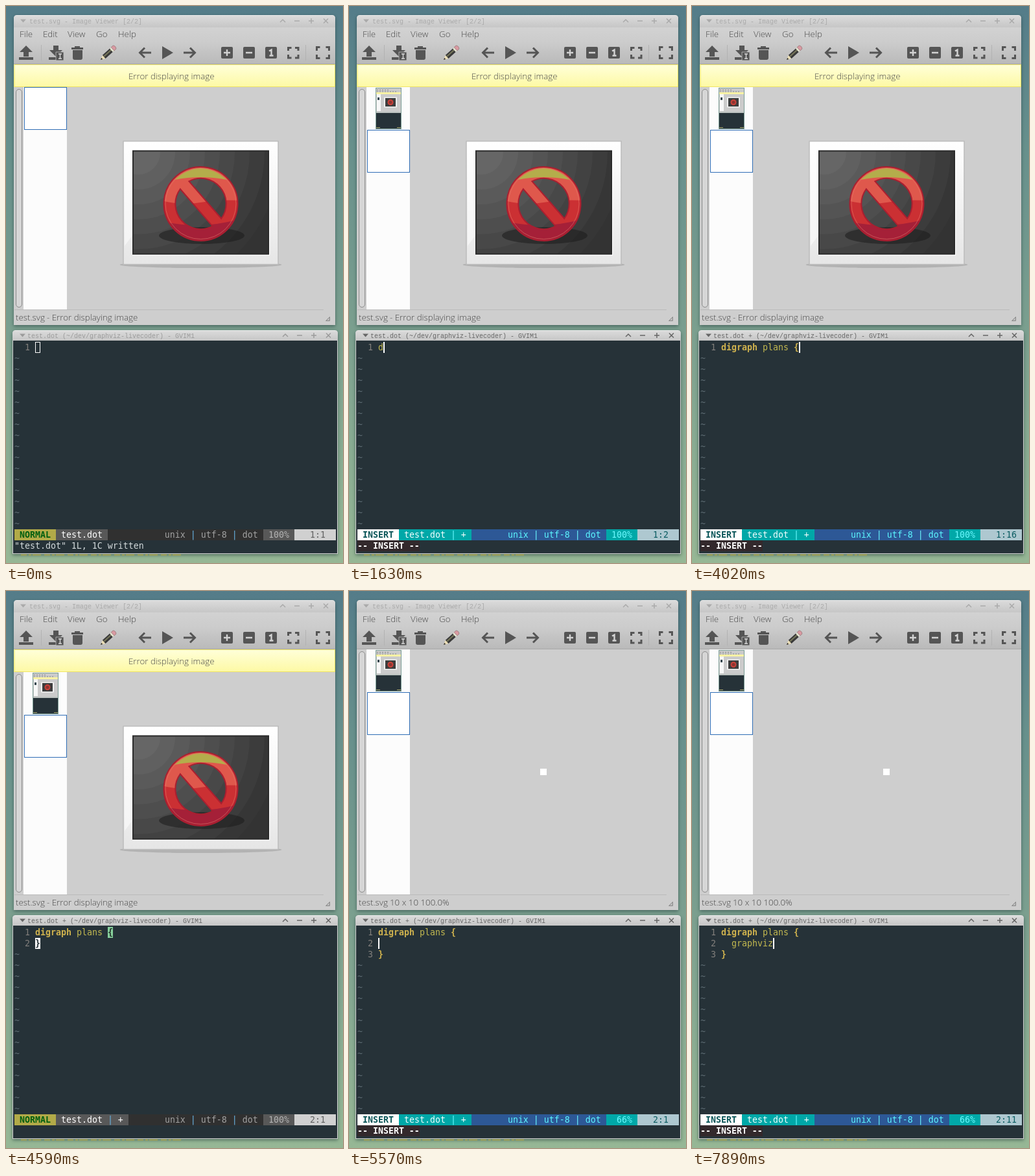
Write an HTML page that moves like this. It is 520 px wide and 859 px high and loops after 8000 ms.

```html
<!DOCTYPE html>
<html lang="en">
<head>
<meta charset="utf-8">
<title>Graph live coding</title>
<style>
html, body { margin: 0; width: 100%; height: 100%; overflow: hidden; }
body {
  position: relative;
  background: linear-gradient(#547c89, #67908c 25%, #7ca08f 60%, #96b795);
}
svg { position: absolute; left: 0; top: 0; }
.win { position: absolute; border-radius: 5px 5px 0 0; box-shadow: 0 2px 5px rgba(20, 45, 45, .5); }
#viewer { left: 12px; top: 14px; width: 496px; height: 478px; background: #cecece; }
#editor { left: 10px; top: 500px; width: 502px; height: 345px; background: #d0d0d0; }
.ui { font: 300 13.33px "Open Sans", sans-serif; fill: #4a4a4a; }
.title { font: 10px "Liberation Mono", monospace; }
.ok .err, svg:not(.ok) .good { display: none; }
.two #first, svg:not(.two) #thumb { display: none; }
#grid {
  position: absolute; left: 13px; top: 518px; width: 496px; height: 323px;
  font: 13.289px/17px "DejaVu Sans Mono", monospace; color: #c3b950;
}
#grid span { position: absolute; height: 17px; white-space: pre; }
#grid .num { color: #827f7c; }
#grid .tilde { color: #5d6c73; }
#grid .key { color: #cfb24e; font-weight: bold; }
#grid .match { background: #86cf9b; color: #24352c; font-weight: bold; }
#grid .box { box-sizing: border-box; width: 8px; border: 1px solid #fff; }
#grid .block { width: 8px; background: #fff; color: #263238; font-weight: bold; }
#grid .bar { width: 2px; background: #fff; }
#grid .msg { color: #d3dadc; }
#grid .ins { color: #fff; background: #33292c; font-weight: bold; }
#grid .mode { font-weight: bold; }
.N .mode { background: #b2aa48; color: #005f10; }
.N .file { background: #585858; color: #fff; }
.N .mid { background: #303030; color: #a2a2a2; }
.N .pct { background: #585858; color: #b4b4b4; }
.N .pos { background: #d0d0d0; color: #606060; }
.N i { color: #68b4e4; font-style: normal; }
.I .mode { background: #fff; color: #0a5558; }
.I .file { background: #00a8a8; color: #f2ffff; }
.I .mid { background: #2d5896; color: #5cf6ff; }
.I .pct { background: #00a8a8; color: #6cfaff; }
.I .pos { background: #aec8d0; color: #0a5c62; }
.I i { color: #6cfaff; font-style: normal; }
</style>
</head>
<body>
<div class="win" id="viewer"></div>
<div class="win" id="editor"></div>

<svg id="scene" width="520" height="859" viewBox="0 0 520 859">
  <defs>
    <linearGradient id="bar" x2="0" y2="1"><stop stop-color="#dcdcdc"/><stop offset="1" stop-color="#c6c6c6"/></linearGradient>
    <linearGradient id="tools" x2="0" y2="1"><stop stop-color="#d2d2d2"/><stop offset=".4" stop-color="#cccccc"/><stop offset="1" stop-color="#b9b9b9"/></linearGradient>
    <linearGradient id="warn" x2="0" y2="1"><stop stop-color="#ffffda"/><stop offset="1" stop-color="#fdf9a4"/></linearGradient>
    <linearGradient id="mat" x2="0" y2="1"><stop stop-color="#fff"/><stop offset="1" stop-color="#e6e6e6"/></linearGradient>
    <clipPath id="photo"><rect x="197" y="224" width="208" height="158"/></clipPath>
    <path id="ring" d="M-57 0A57 57 0 1 1 57 0A57 57 0 1 1 -57 0ZM-38 -9A39 39 0 0 1 38 -9ZM-38 9A39 39 0 0 0 38 9Z" transform="translate(300.500 305) rotate(49)"/>
    <clipPath id="sign"><use href="#ring" clip-rule="evenodd"/></clipPath>
    <g id="buttons" fill="none" stroke="currentColor" stroke-width="1.500">
      <path d="M0 2l4-4 4 4M22 0h8M44 0h8M48 -4v8M67 -3.500l7 7M74 -3.500l-7 7"/>
    </g>
  </defs>

  <!-- image viewer chrome -->
  <path d="M12 33V19q0-5 5-5H503q5 0 5 5V33z" fill="url(#bar)"/>
  <path d="M16 14.500H504" stroke="#ebebeb"/>
  <g color="#aaa" fill="#aaa">
    <path d="M22 20.500h9l-4.500 5z"/>
    <text class="title" x="36" y="27">test.svg - Image Viewer [2/2]</text>
    <use href="#buttons" x="423" y="23"/>
  </g>
  <rect x="12" y="33" width="496" height="57" fill="url(#tools)"/>
  <path d="M12 89.500H508" stroke="#a8a8a8"/>
  <g class="ui">
    <text x="21" y="48">File</text><text x="57" y="48">Edit</text><text x="95" y="48">View</text>
    <text x="139" y="48">Go</text><text x="173" y="48">Help</text>
  </g>
  <path d="M54.500 60V84M462.500 60V84" stroke="#b2b2b2"/>
  <g fill="#555">
    <path d="M31 61l10 10h-6v7h-8v-7h-6zM20 79h22v4H20z"/>
    <path d="M73 61h8v7h6l-10 10-10-10h6zM66 79h11v4H66z"/>
    <path d="M77 71h12v13H77z" stroke="#c2c2c2" stroke-width=".8"/>
    <path d="M101 64h5v-2h8v2h5v3h-18zM103 68h15v12q0 3-3 3h-9q-3 0-3-3z"/>
    <path d="M241 62l17 10-17 10z"/>
    <rect x="332" y="63" width="18" height="18" rx="2"/>
    <rect x="366" y="63" width="18" height="18" rx="2"/>
    <rect x="400" y="63" width="18" height="18" rx="2"/>
  </g>
  <path d="M81 74h5M83.500 74v7M81 81h5" stroke="#ddd" stroke-width="1.300" fill="none"/>
  <path d="M336 72h10M341 67v10M370 72h10M406 69.500l3.500-2v9M406.500 76.500h6" stroke="#d2d2d2" stroke-width="2.400" fill="none"/>
  <g fill="none" stroke="#555" stroke-width="3">
    <path d="M207 72h17M214 64.500l-7.500 7.500 7.500 7.500M274 72h17M284 64.500l7.500 7.500-7.500 7.500"/>
    <path id="corners" d="M435.500 69v-4.500h5M446 64.500h5v4.500M451 75v5h-5M440.500 80h-5v-5"/>
    <path d="M479.500 69v-5.500h5M493.500 63.500h5v5.500M498.500 75v5.500h-5M484.500 80.500h-5v-5.500"/>
  </g>
  <g transform="translate(146 83) rotate(-42)">
    <path d="M0 0L7-3.500V3.500z" fill="#eadcb4"/><path d="M0 0l3-1.500v3z" fill="#222"/>
    <path d="M7-3.500H23v7H7z" fill="#3a3a3a"/><path d="M7-1.500H23v2H7z" fill="#77775a"/>
    <path d="M22-3.500h3v7h-3z" fill="#e3e3d0"/><path d="M25-3.500h4q3 3.500 0 7h-4z" fill="#d99aa2" stroke="#8a6a6a" stroke-width=".6"/>
  </g>

  <!-- thumbnails -->
  <rect x="27" y="90" width="67" height="378" fill="#fcfcfc"/>
  <g fill="#d6d6d6" stroke="#8c8c8c">
    <rect class="err" x="15.500" y="128.500" width="9" height="336" rx="4.500"/>
    <rect class="good" x="15.500" y="93.500" width="9" height="371" rx="4.500"/>
  </g>
  <g id="list">
    <g id="thumb">
      <rect x="41" y="126" width="40" height="64" fill="#7a9c94"/>
      <rect x="42" y="127" width="38" height="36" fill="#cbcbcb"/>
      <path d="M43 129.500h20M43 132h32" stroke="#868686" stroke-dasharray="2 2"/>
      <rect x="42" y="133" width="38" height="3" fill="#f8f2a4"/>
      <rect x="43" y="136" width="6" height="26" fill="#f7f7f7"/>
      <rect x="44" y="141" width="3" height="4" fill="#37474f"/>
      <rect x="54" y="140.500" width="20" height="16" fill="#eee"/>
      <rect x="56" y="142" width="16" height="13" fill="#3d3d3d"/>
      <circle cx="64" cy="148.500" r="3.500" fill="#8a3532" stroke="#cc4038" stroke-width="2"/>
      <rect x="42" y="163" width="38" height="2" fill="#bdc3c0"/>
      <rect x="42" y="165" width="38" height="24" fill="#263238"/>
      <path d="M42 187.500h6M74 187.500h6" stroke="#a7a76c"/>
    </g>
    <rect id="pick" x="28.500" y="125.500" width="65" height="65" fill="#fff" stroke="#2f6db5"/>
  </g>

  <!-- error picture -->
  <g class="err">
    <rect x="12" y="90" width="496" height="35" fill="url(#warn)"/>
    <rect x="13" y="90.500" width="494.500" height="34" fill="none" stroke="#f0e564"/>
    <text class="ui" x="189" y="113">Error displaying image</text>
    <ellipse cx="300.500" cy="399" rx="125" ry="5" fill="#b2b2b2"/>
    <rect x="181" y="208.500" width="239" height="190" fill="url(#mat)" stroke="#bcbcbc" stroke-width="1.500"/>
    <path d="M183 370L300 210H183z" fill="#fff" opacity=".5"/>
    <rect x="195" y="222" width="212" height="163" fill="#fff"/>
    <g clip-path="url(#photo)" id="glow"><rect x="196" y="223" width="210" height="160" fill="#333"/></g>
    <ellipse cx="302" cy="354" rx="66" ry="13" fill="#1d1d1d" opacity=".55"/>
    <rect x="196" y="223.500" width="209" height="159" fill="none" stroke="#2b2b2b" stroke-width="2"/>
    <g clip-path="url(#sign)">
      <rect x="240" y="245" width="122" height="122" fill="#df584c"/>
      <path d="M240 300Q270 308 300 303T362 300V367H240z" fill="#cb3033"/>
      <path d="M240 332Q300 346 362 328V367H240z" fill="#a52038"/>
      <path d="M260 268Q300 232 341 268Q300 260 260 268z" fill="#b4ad4b"/>
    </g>
    <use href="#ring" fill="none" stroke="#a91f30" stroke-width="2"/>
    <circle cx="300.500" cy="305" r="54.500" fill="none" stroke="#e8776a" opacity=".55"/>
  </g>
  <rect class="good" x="295" y="274" width="10" height="10" fill="#fff"/>

  <!-- viewer status bar -->
  <path d="M13 468.500H490" stroke="#bababa"/>
  <g class="ui">
    <text x="15" y="485">test.svg</text>
    <text class="err" x="63" y="485">- Error displaying image</text>
    <text class="good" x="63" y="485">10 x 10 100.0%</text>
  </g>
  <path d="M493.500 485.500l6-6v6z" fill="#bbb" stroke="#888"/>

  <!-- editor chrome -->
  <path d="M10 516V505q0-5 5-5H507q5 0 5 5V516z" fill="url(#bar)"/>
  <path d="M14 500.500H508" stroke="#ececec"/>
  <g id="head" color="#666" fill="#666">
    <path d="M21 505.500h9l-4.500 5z"/>
    <text class="title" id="name" x="33" y="511.500"></text>
    <use href="#buttons" x="427" y="508"/>
  </g>
  <rect x="11" y="516" width="500" height="328" fill="#263238"/>
  <path d="M23 846.500H270" stroke="#c3ab38" stroke-width="1.500" stroke-dasharray="9 3 4 2 13 5" opacity=".75"/>
</svg>
<div id="grid"></div>

<script>
const LOOP = 8000;
const $ = id => document.getElementById(id);
const scene = $('scene'), grid = $('grid');

// stepped light falling from the photo's upper left corner
for (let i = 0; i < 9; i++) {
  const c = document.createElementNS('http://www.w3.org/2000/svg', 'circle');
  const v = 54 + i * 6;
  c.setAttribute('cx', 204);
  c.setAttribute('cy', 226);
  c.setAttribute('r', 218 - i * 23);
  c.setAttribute('fill', `rgb(${v},${v},${v})`);
  $('glow').append(c);
}

const cues = [];
const cue = (t, change) => cues.push([t, change]);
const type = (row, base, text, times) => times.forEach((t, i) => {
  const line = base + text.slice(0, i + 1);
  cue(t, { ['line' + row]: line, col: line.length });
});

cue(0, {
  mode: 'N', dirty: false, plus: false, rows: 1, row: 0, col: 0, cursor: 'box', match: 0,
  line0: '', line1: '', line2: '', msg: '"test.dot" 1L, 1C written',
  focus: 0.5, two: false, ok: false
});
[310, 370, 430, 490, 550].forEach((t, i) => cue(t, { focus: 0.6 + i * 0.1, cursor: 'block' }));
cue(990, { two: true });
cue(1150, { msg: '-- INSERT --', cursor: 'bar' });
cue(1190, { mode: 'I' });
cue(1630, { line0: 'd', col: 1, dirty: true });
cue(1670, { plus: true });
type(0, 'd', 'igraph plans {', [1800, 2010, 2240, 2380, 2570, 2660, 2810, 3190, 3400, 3440, 3600, 3650, 3810, 4020]);
cue(4190, { rows: 2, row: 1, col: 0 });
cue(4400, { line1: '}', col: 1, match: 2 });
cue(4460, { msg: '' });
cue(4530, { col: 0, cursor: 'block', match: 1 });
cue(4590, { mode: 'N' });
cue(4730, { msg: ':', cursor: 'cmd' });
cue(4800, { msg: ':w' });
cue(4890, { msg: '"test.dot" 2L, 18C written', dirty: false, cursor: 'block' });
cue(4930, { plus: false });
cue(5130, { row: 0, match: 0 });
cue(5530, { mode: 'I', dirty: true, rows: 3, row: 1, line1: '', line2: '}', msg: '-- INSERT --', cursor: 'none' });
cue(5570, { plus: true, cursor: 'bar', ok: true });
cue(6250, { line1: '  ', col: 2 });
type(1, '  ', 'graphviz', [6850, 7010, 7060, 7100, 7150, 7660, 7780, 7890]);

const cell = (row, col, text, cls = '') =>
  `<span class="${cls}" style="left:${col * 8}px;top:${row * 17}px">${text}</span>`;
// a run of cells with a filled background
const strip = (col, width, text, cls) =>
  `<span class="${cls}" style="left:${col * 8}px;top:289px;width:${width * 8}px">${text}</span>`;

function codeLine(row, line) {
  const key = line.startsWith('digraph') ? 7 : 0;
  const brace = line.search(/[{}]/);
  let out = cell(row, 2, row + 1, 'num');
  if (key) out += cell(row, 4, 'digraph', 'key');
  out += cell(row, 4 + key, line.slice(key, brace < 0 ? undefined : brace));
  if (brace >= 0) out += cell(row, 4 + brace, line[brace], 'key');
  return out;
}

function statusLine(s) {
  const bar = '<i>|</i>';
  const pct = Math.floor((s.row + 1) / s.rows * 100) + '%';
  const file = s.dirty ? 14 : 10;
  return strip(0, 8, s.mode === 'N' ? ' NORMAL' : ' INSERT', 'mode')
    + strip(8, file, s.dirty ? ` test.dot ${bar} +` : ' test.dot', 'file')
    + strip(8 + file, 40 - file, ' '.repeat(21 - file) + `unix ${bar} utf-8 ${bar} dot`, 'mid')
    + strip(48, 6, pct.padStart(5), 'pct')
    + strip(54, 8, `   ${s.row + 1}:${s.col + 1}`, 'pos');
}

function cursor(s) {
  const at = 4 + s.col;
  if (s.cursor === 'none') return '';
  if (s.cursor === 'cmd') return cell(18, s.msg.length, '', 'block');
  const under = s.cursor === 'block' ? s['line' + s.row][s.col] || '' : '';
  return cell(s.row, at, under, s.cursor);
}

function draw(s) {
  scene.setAttribute('class', (s.ok ? 'ok ' : '') + (s.two ? 'two' : ''));
  $('list').setAttribute('transform', `translate(0 ${s.ok ? -35 : 0})`);
  $('pick').setAttribute('y', s.two ? 191.5 : 125.5);
  $('head').setAttribute('opacity', s.focus);
  $('name').textContent = `test.dot ${s.plus ? '+ ' : ''}(~/dev/graphviz-livecoder) - GVIM1`;
  let out = '';
  for (let r = 0; r < 17; r++)
    out += r < s.rows ? codeLine(r, s['line' + r]) : cell(r, 0, '~', 'tilde');
  if (s.match) out += cell(0, 18, '{', 'match');
  if (s.match > 1) out += cell(1, 4, '}', 'match');
  out += statusLine(s) + cell(18, 0, s.msg, s.msg.startsWith('--') ? 'ins' : 'msg') + cursor(s);
  grid.className = s.mode;
  grid.innerHTML = out;
}

const start = performance.now();
let shown = -1;
function tick() {
  const t = (performance.now() - start) % LOOP;
  const past = cues.filter(c => c[0] <= t);
  if (past.length !== shown) {
    shown = past.length;
    draw(Object.assign({}, ...past.map(c => c[1])));
  }
  requestAnimationFrame(tick);
}
tick();
</script>
</body>
</html>
```
